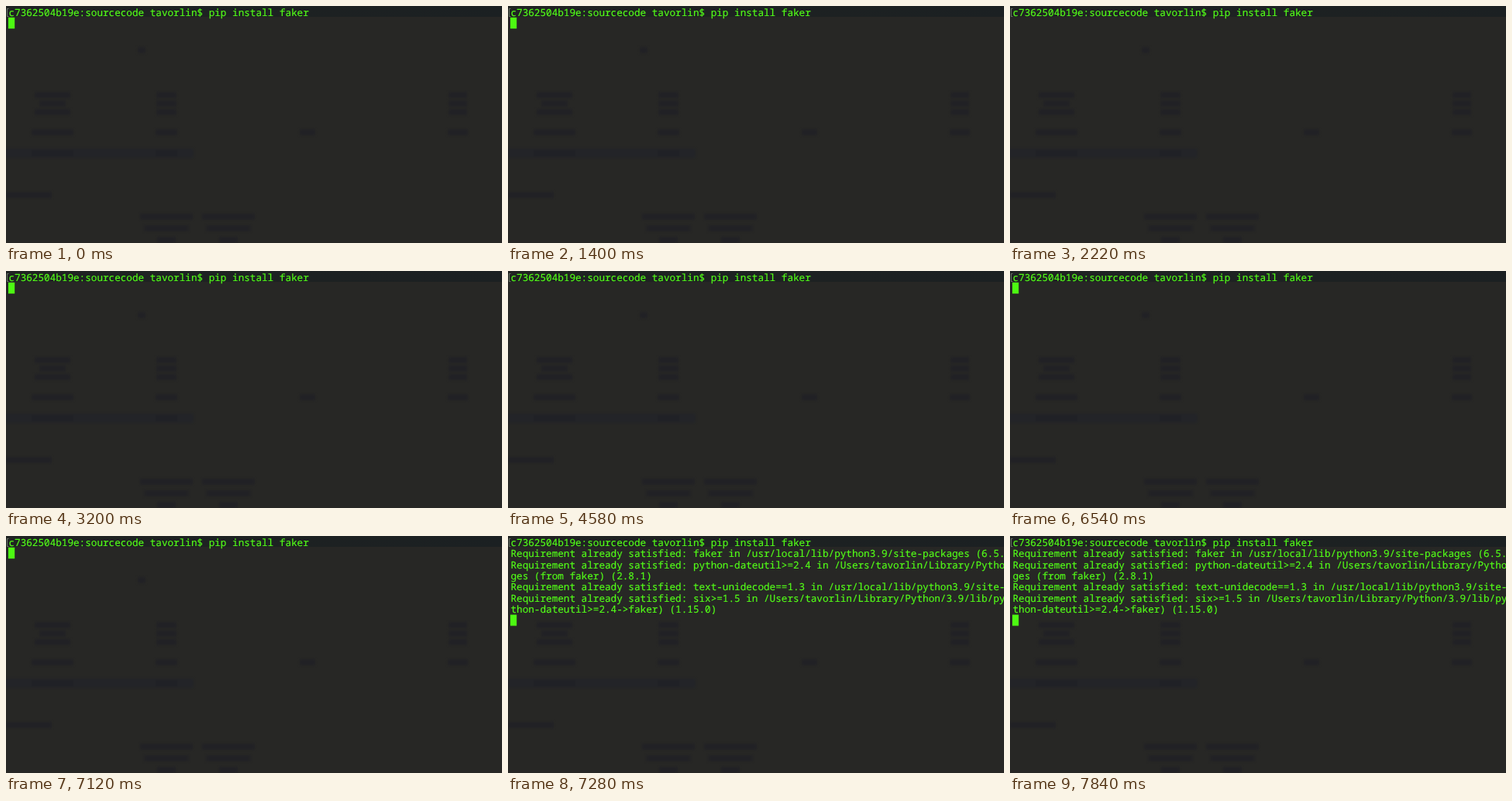
Animation of 640x306 px, one loop 8000 ms. Source, as an HTML page:

```html
<!DOCTYPE html>
<html lang="en">
<head>
<meta charset="utf-8">
<title>Terminal</title>
<style>
  html, body { margin: 0; width: 100%; height: 100%; overflow: hidden; background: #272725; }
  svg { display: block; width: 100%; height: 100%; }
  text {
    font: 12.67px "Noto Sans Mono", "DejaVu Sans Mono", monospace;
    white-space: pre;
    fill: #52fb18;
    stroke: #52fb18;
    stroke-width: .2px;
    text-rendering: geometricPrecision;
  }
  .cursor { fill: #4dfa12; animation: blink 8s step-end infinite; }
  .place { animation: drop 8s step-end infinite; }
  .output { animation: print 8s step-end infinite; }

  @keyframes blink {
    0%, 17.0625%, 37.9375%, 58.8125%, 79.6875%, 100% { opacity: 1; }
    6.625%, 27.5%, 48.375%, 69.25% { opacity: 0; }
  }
  @keyframes drop {
    0% { transform: translateY(0); }
    91%, 100% { transform: translateY(86.7px); }
  }
  @keyframes print {
    0% { visibility: hidden; }
    91%, 100% { visibility: visible; }
  }
</style>
</head>
<body>
<svg viewBox="0 0 640 306" preserveAspectRatio="none">
  <defs>
    <linearGradient id="bar">
      <stop offset="0" stop-color="#202322"/>
      <stop offset="1" stop-color="#1b2022"/>
    </linearGradient>
    <filter id="soft" x="-5%" y="-5%" width="110%" height="110%" color-interpolation-filters="sRGB">
      <feGaussianBlur stdDeviation="1.6"/>
    </filter>
  </defs>
  <rect width="640" height="306" fill="#272725"/>
  <rect width="640" height="14" fill="url(#bar)"/>

  <!-- page showing faintly through the window -->
  <g filter="url(#soft)">
    <rect x="-4" y="184" width="246" height="12" fill="#232428"/>
    <g id="ghost" stroke="#202126" stroke-width="8" opacity=".75"></g>
  </g>

  <path d="M3.5 3.5H1.5V13.5H3.5" fill="none" stroke="#7d8a78" stroke-width=".8"/>
  <text x="3.5" y="12.6">c7362504b19e:sourcecode tavorlin$ pip install faker</text>
  <g class="output" id="output"></g>
  <g class="place"><rect class="cursor" x="3" y="14.8" width="8.2" height="14.4"/></g>
</svg>
<script>
  const NS = "http://www.w3.org/2000/svg";

  function add(parent, tag, attrs, text = "") {
    const node = document.createElementNS(NS, tag);
    for (const key in attrs) node.setAttribute(key, attrs[key]);
    node.textContent = text;
    document.getElementById(parent).append(node);
  }

  const done = "Requirement already satisfied: ";
  const home = "/Users/tavorlin/Library/";
  [
    done + "faker in /usr/local/lib/python3.9/site-packages (6.5.",
    done + "python-dateutil>=2.4 in " + home + "Pytho",
    "ges (from faker) (2.8.1)",
    done + "text-unidecode==1.3 in /usr/local/lib/python3.9/site-",
    done + "six>=1.5 in " + home + "Python/3.9/lib/py",
    "thon-dateutil>=2.4->faker) (1.15.0)"
  ].forEach((line, i) => add("output", "text", { x: 3.5, y: 12.6 + 14.45 * (i + 1) }, line));

  const smudge = (x, y, width) =>
    add("ghost", "line", { x1: x - width / 2, x2: x + width / 2, y1: y, y2: y });

  const left = 60, mid = 207, right = 583;
  smudge(175, 57, 10);
  smudge(389, 163, 20);
  smudge(29, 244, 60);
  for (let row = 0; row < 3; row++) {
    const y = 115 + 11 * row;
    smudge(left, y, row === 1 ? 34 : 46);
    smudge(mid, y, 26);
    smudge(right, y, 24);

    // two captions that narrow downwards
    for (const x of [mid, mid + 80]) smudge(x, 272 + 15 * row, 68 - 11 * row * row);
  }
  for (const y of [163, 190]) {
    smudge(left, y, 54);
    smudge(mid, y, 28);
  }
  smudge(right, 163, 26);
</script>
</body>
</html>
```
